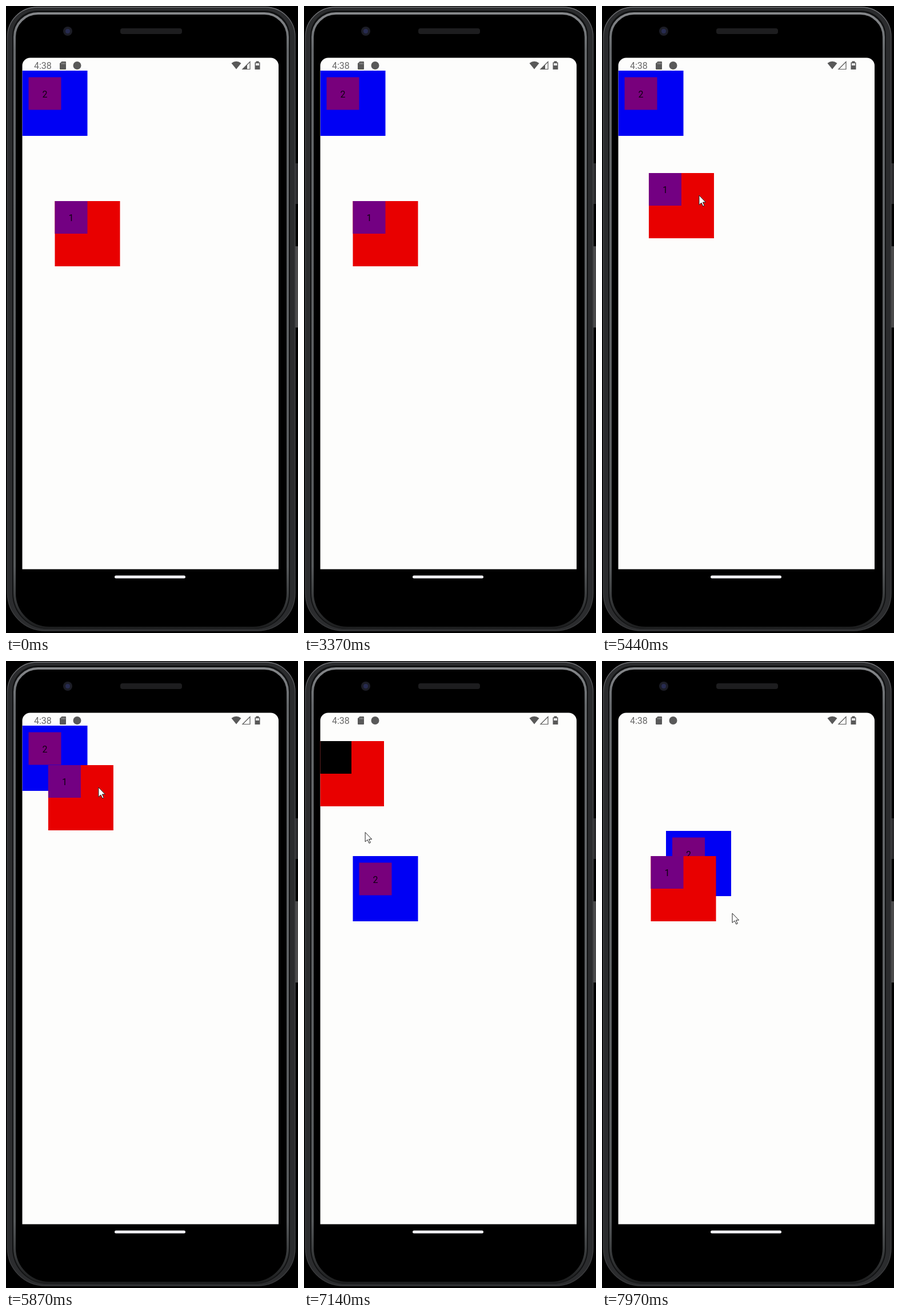
Recreate the animation shown at these times as an HTML page. Size 511x1096 px, loop 8000 ms.

```html
<!DOCTYPE html>
<html lang="en">
<head>
<meta charset="utf-8">
<title>Dragging boxes</title>
<style>
  html, body { margin: 0; width: 100%; height: 100%; overflow: hidden; background: #000; }
  svg { display: block; width: 100vw; height: 100vh; }
  text { font-family: Roboto, sans-serif; font-size: 16px; }
  .label { text-anchor: middle; fill: #000; fill-opacity: .87; }
</style>
</head>
<body>
<svg viewBox="0 0 511 1096">
  <defs>
    <clipPath id="screen"><path d="M28.500 984.500V104.500a14 14 0 0 1 14-14H463a14 14 0 0 1 14 14V984.500Z"/></clipPath>
    <linearGradient id="edge" x2="0" y2="1">
      <stop stop-color="#77787c"/>
      <stop offset=".05" stop-color="#47484b"/>
      <stop offset="1" stop-color="#3a3b3d"/>
    </linearGradient>
    <linearGradient id="rim" x2="0" y2="1">
      <stop stop-color="#85878a"/>
      <stop offset=".06" stop-color="#64676a"/>
      <stop offset=".9" stop-color="#56595b"/>
      <stop offset="1" stop-color="#1c1d1e"/>
    </linearGradient>
  </defs>

  <!-- phone body and side buttons -->
  <path d="M506 275h5v71h-5z" fill="#2b2b2d"/>
  <path d="M506 420h5v142h-5z" fill="#4b4b4c"/>
  <path d="M2.500 54A52 52 0 0 1 54.500 2H454A52 52 0 0 1 506 54V1026A66 66 0 0 1 440 1092H68.500A66 66 0 0 1 2.500 1026Z"
        fill="#2b2c2e" stroke="url(#edge)" stroke-width="1.500"/>
  <path d="M11 54A44 44 0 0 1 55 8H453A44 44 0 0 1 497 54V1026A62 62 0 0 1 435 1089H73A62 62 0 0 1 11 1026Z"
        fill="#111213"/>
  <path d="M15 54A41 41 0 0 1 56 13H452A41 41 0 0 1 493 54V1026A61 61 0 0 1 432 1087H76A61 61 0 0 1 15 1026Z"
        stroke="url(#rim)" stroke-width="4"/>
  <rect x="200" y="39" width="108" height="10" rx="4" fill="#1d1d1f"/>
  <circle cx="108" cy="44" r="8" fill="#1c1d26"/>
  <circle cx="108" cy="44" r="4" fill="#272b50"/>
  <rect x="190" y="995.500" width="124" height="5" rx="2.500" fill="#f2f2f6"/>

  <g clip-path="url(#screen)">
    <path d="M28 90h450v895H28z" fill="#fdfdfc"/>
    <g fill="#595959">
      <text x="49" y="110" fill="#686868">4:38</text>
      <path d="M97.500 97H104a1 1 0 0 1 1 1v12a1 1 0 0 1-1 1H95a1 1 0 0 1-1-1v-9.500Z"/>
      <path d="M98 99v3m2.500-3v3m2.500-3v3" stroke="#aaa"/>
      <circle cx="124.500" cy="104" r="7"/>
      <path d="M394.500 100Q403 93.500 411.500 100L403 110.500Z"/>
      <path d="M414 110.500 427 97.500V110.500Z" fill="#fdfdfc" stroke="#595959" stroke-width="1.200"/>
      <path id="signal" d="M413.500 111 422 102.500V111Z"/>
      <path d="M437.500 96.500h5v2h2v12.500h-9V98.500h2Z"/>
      <path d="M437 100h6v4h-6z" fill="#e6e6e6"/>
    </g>
    <g id="blue">
      <path d="M0 0h114v114H0z" fill="#0000f4"/>
      <path d="M11 11.500h57v57H11z" fill="#78007c"/>
      <text class="label" x="39.500" y="46.500">2</text>
    </g>
    <g id="red">
      <path d="M0 0h114v114H0z" fill="#e80000"/>
      <path id="redChild" d="M0 0h57v57H0z"/>
      <text class="label" x="28.500" y="35">1</text>
    </g>
  </g>
  <path id="cursor" d="M0 0V16.500L4 13 6.800 19 9.200 18 6.500 12H11.500Z" fill="#fff" stroke="#222" stroke-width="1"/>
</svg>
<script>
const LOOP = 8000, RED_DROP = 6500, BLUE_DROP = 7700;

// Tracks of [time, x, y]; two points at the same time make a jump.
const tracks = {
  red: [
    [0, 85.5, 341], [5250, 85.5, 341], [5870, 74, 182], [RED_DROP, 26, 140],
    [BLUE_DROP, 26, 140], [BLUE_DROP, 85.5, 341]
  ],
  blue: [
    [0, 28.5, 113], [RED_DROP, 28.5, 113], [RED_DROP, 85.5, 341],
    [7350, 85.5, 341], [BLUE_DROP, 112, 297]
  ],
  cursor: [
    [1260, 300, 500], [1460, 126.5, 360], [1640, 126.5, 360], [2030, 300, 500],
    [4780, 300, 500], [5150, 173.5, 380], [5250, 173.5, 380], [5870, 162, 221],
    [RED_DROP, 114, 179], [6700, 114, 179], [7140, 107, 299], [7350, 130, 400],
    [BLUE_DROP, 156.5, 356], [7970, 228, 441]
  ]
};

const byId = id => document.getElementById(id);
const show = (id, visible) => byId(id).setAttribute("visibility", visible ? "visible" : "hidden");

function positionAt(track, time) {
  const next = track.findIndex(point => point[0] > time);
  if (next === 0) return track[0].slice(1);
  if (next < 0) return track.at(-1).slice(1);
  const [t0, x0, y0] = track[next - 1], [t1, x1, y1] = track[next];
  const k = (time - t0) / (t1 - t0);
  return [x0 + (x1 - x0) * k, y0 + (y1 - y0) * k];
}

function render(time) {
  for (const [id, track] of Object.entries(tracks)) {
    byId(id).setAttribute("transform", `translate(${positionAt(track, time)})`);
  }
  const dropped = time >= RED_DROP && time < BLUE_DROP;
  byId("redChild").setAttribute("fill", dropped ? "#000" : "#730082");
  show("cursor", (time >= 1260 && time < 2030) || time >= 4780);
  show("signal", time < 5200);
}

const start = performance.now();
function tick() {
  render((performance.now() - start) % LOOP);
  requestAnimationFrame(tick);
}
tick();
</script>
</body>
</html>
```
